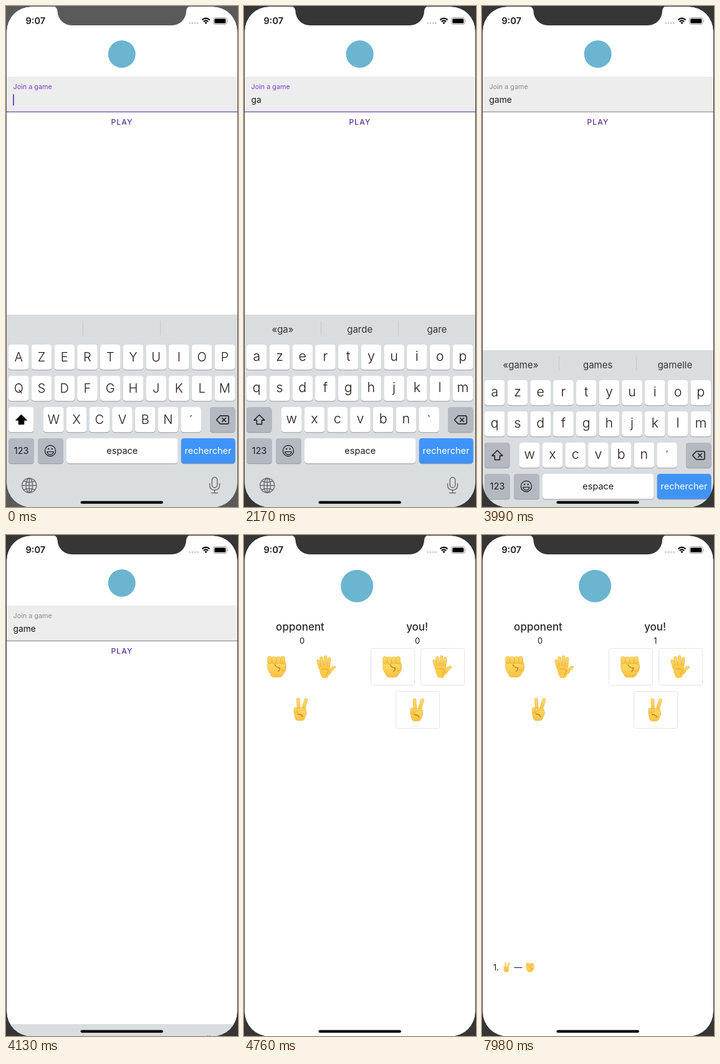
These frames come from a looping animation (372x802 px, 8000 ms). An HTML page:

```html
<!DOCTYPE html>
<html lang="fr">
<head>
<meta charset="utf-8">
<title>Hand game</title>
<style>
  html, body { margin: 0; width: 100%; height: 100%; overflow: hidden; background: #363636; }
  svg.stage { display: block; width: 100vw; height: 100vh; }
  text { font-family: Inter, Roboto, sans-serif; fill: #1c1c1e; }
  .mid { text-anchor: middle; }
  .timed { animation: 8s linear infinite; }
  .bezel { fill: #363636; animation-name: bezel; }
  .caret { fill: #7b4cc0; animation-name: blink; }
  .label { font-size: 10.8px; animation-name: label; }
  .line { animation-name: line; }
  .play { font-size: 12px; font-weight: 500; letter-spacing: 1.2px; fill: #5b2f9e; }
  .typed { font-size: 13.8px; }
  .keyboard { animation-name: hide; }
  .join { animation-name: parallax; }
  .game { animation-name: push; }
  .words { animation-name: words; }
  .hint { font-size: 15px; fill: #333; }
  .upper { font-size: 20px; font-weight: 350; }
  .lower { font-size: 21.5px; font-weight: 350; }
  .small { font-size: 14.5px; }
  .icon { fill: none; stroke: #111; stroke-width: 1.4; stroke-linejoin: round; stroke-linecap: round; }
  .gray { stroke: #6a6c70; }
  .title { font-size: 17px; font-weight: 500; fill: #2b2b2b; }
  .score { font-size: 13px; }
  .skin { fill: url(#skin); stroke: #e5a435; stroke-width: .6; }
  .crease { fill: none; stroke: #bd751b; stroke-width: 1.1; stroke-linecap: round; }
  .button { fill: #fff; stroke: #e4e4e6; }
  .press { animation-name: press; }
</style>
</head>
<body>
<script>
const LOOP = 8000;
const css = [];

// Turns {ms: declarations} into a named keyframe rule.
function frames(name, stops) {
  const body = Object.entries(stops).map(([ms, rule]) => `${ms / LOOP * 100}% {${rule}}`).join(' ');
  css.push(`@keyframes ${name} {${body}}`);
}

// Shows the content only between two times, with hard cuts.
function during(from, to, content) {
  const name = `show-${from}-${to}`;
  const stops = { 0: 'opacity:0' };
  stops[from] = 'opacity:1';
  stops[to] = to < LOOP ? 'opacity:0' : 'opacity:1';
  frames(name, stops);
  return `<g class="timed" style="animation-name:${name};animation-timing-function:step-end">${content}</g>`;
}

const ease = 'animation-timing-function:cubic-bezier(.283,.99,.318,.99);';
frames('bezel', { 0: 'fill:#5a5a5a', 70: 'fill:#5a5a5a', 910: 'fill:#363636', 8000: 'fill:#363636' });
frames('blink', {
  0: 'opacity:1', 70: 'opacity:1', 280: 'opacity:0', 420: 'opacity:0', 630: 'opacity:1',
  1890: 'opacity:1', 2100: 'opacity:0', 2200: 'opacity:0', 2380: 'opacity:1',
  3640: 'opacity:1', 3850: 'opacity:0', 8000: 'opacity:0'
});
frames('label', { 0: 'fill:#7b3fc4', 3700: 'fill:#7b3fc4', 3850: 'fill:#8a8a8a', 8000: 'fill:#8a8a8a' });
frames('line', { 0: 'fill:#7d4fb5', 3700: 'fill:#7d4fb5', 3850: 'fill:#999', 8000: 'fill:#999' });
frames('hide', {
  0: 'transform:translateY(0)', 3972: 'transform:translateY(0);' + ease,
  4330: 'transform:translateY(310px)', 8000: 'transform:translateY(310px)'
});
frames('push', {
  0: 'transform:translateX(390px)', 4139: 'transform:translateX(390px)', 4143: 'transform:translateX(372px);' + ease,
  4743: 'transform:translateX(0)', 8000: 'transform:translateX(0)'
});
frames('parallax', {
  0: 'transform:translateX(0)', 4143: 'transform:translateX(0);' + ease,
  4743: 'transform:translateX(-111px)', 8000: 'transform:translateX(-111px)'
});
frames('words', { 0: 'opacity:0', 3429: 'opacity:0', 3430: 'opacity:.6', 3499: 'opacity:.6', 3500: 'opacity:1', 8000: 'opacity:1' });
frames('press', { 0: 'opacity:0', 7200: 'opacity:0', 7280: 'opacity:.12', 7420: 'opacity:.12', 7600: 'opacity:0', 8000: 'opacity:0' });

const text = (x, y, cls, value) => `<text x="${x}" y="${y}" class="${cls}">${value}</text>`;
const rect = (x, y, w, h, r, attrs) => `<rect x="${x}" y="${y}" width="${w}" height="${h}" rx="${r}" ${attrs}/>`;
const path = (d, cls, attrs = '') => `<path d="${d}" class="${cls}" ${attrs}/>`;
const use = (id, x, y, scale = 1) => `<use href="#${id}" transform="translate(${x} ${y}) scale(${scale})"/>`;
const finger = (x, y, w, h, turn = 0) =>
  rect(x - w / 2, y - h, w, h, w / 2, `class="skin" transform="rotate(${turn} ${x} ${y})"`);

const defs = `<defs>
  <linearGradient id="skin" x1="0" y1="0" x2="0" y2="1">
    <stop offset="0" stop-color="#ffdf68"/><stop offset="1" stop-color="#f8c040"/>
  </linearGradient>
  <linearGradient id="edge"><stop offset="0" stop-opacity="0"/><stop offset="1" stop-opacity=".2"/></linearGradient>
  <g id="fist">
    ${path('M-14 -7H14C16 1 15 7 11 11Q9 17 3 17H-4Q-9 17 -10 12Q-17 4 -14 -7Z', 'skin')}
    ${[-11.3, -4.3, 2.7, 9.6].map((x, i) => finger(x, [-4, -3.5, -3.5, -4][i], 6.8, 12.4)).join('')}
    ${path('M14 -3.5Q3 -6 -3 -3.5Q-3 1.500 4 2Q6 7 11 7.500Q16 3 14 -3.500Z', 'skin')}
    ${path('M-3 -2.5Q0 2.5 5 2Q5 6 2 8', 'crease')}
  </g>
  <g id="hand">
    ${path('M2 14Q8 12 10 6Q14 3 15.300 1.500Q15.500 -1.500 12.500 -1Q8 0 5.500 5Z', 'skin')}
    ${finger(-8.8, 4, 4.2, 16, -16)}${finger(-5.3, 2, 4.6, 18.5, -8)}${finger(-.8, 2, 4.7, 20, 0)}${finger(3.7, 3, 4.4, 18.5, 6)}
    ${path('M-11 0Q-2 -4 6 0L7 6Q8 11 4 14Q3 18 0 18H-4Q-7 18 -8 14Q-11 8 -11 0Z', '', 'fill="#fbca4b"')}
    ${path('M-7 4Q0 2 3 5M5 6Q1 9 1 14', 'crease', 'stroke-opacity=".4"')}
  </g>
  <g id="victory">
    ${finger(-2.8, 4, 4.8, 22, -4)}${finger(2.6, 4, 4.8, 22.5, 17)}
    ${path('M-9 -1Q0 -4 8 0Q11 7 7 12Q6 18 1 18H-4Q-8 18 -9 13Q-12 6 -9 -1Z', 'skin')}
    ${finger(-8.2, 6, 4.8, 9)}${finger(-3.6, 7, 4.8, 9)}
    ${path('M8 1Q2 0 -4 4Q-6 7 -2 8Q2 8 4 12', 'skin')}
    ${path('M-5 8Q0 7 3 12', 'crease')}
  </g>
  <clipPath id="screen">${rect(1, 1, 370, 801.5, 39.5, '')}</clipPath>
</defs>`;

// Join screen: what is typed, when, and where the caret stands.
const typing = [['', 0, 12], ['g', 1050, 20.3], ['ga', 1540, 28.5], ['gam', 2380, 40.3], ['game', 2940, 47.6]];
const typed = typing.map(([value, from, x], i) => {
  const to = typing[i + 1]?.[1] ?? LOOP;
  return during(from, to, text(11.5, 155, 'typed', value) + rect(x - 1, 141, 2, 18.5, 1, 'class="caret timed"'));
}).join('');

const join = `<g class="join timed">
  ${rect(1, 1, 370, 802, 0, 'fill="#fff"')}
  <circle cx="185.7" cy="77" r="22" fill="#6bb5d0"/>
  ${path('M1 170V117Q1 113 5 113H367Q371 113 371 117V170Z', '', 'fill="#ededed"')}
  ${rect(1, 168.8, 370, 1.4, 0, 'class="line timed"')}
  ${text(11.5, 133, 'label timed', 'Join a game')}
  ${typed}
  ${text(186, 190.3, 'play mid', 'PLAY')}
</g>`;

// Keyboard
function key(x, y, w, fill = '#fff') {
  return rect(x, y + 1, w, 40.3, 4.6, 'fill="#96999e"') + rect(x, y, w, 40.3, 4.6, `fill="${fill}"`);
}
const DARK = '#b4b9c1', STEP = 36.72, KEY = 32.6;
const rows = [['azertyuiop', 4, 542], ['qsdfghjklm', 4, 592], ['wxcvbn', 60, 642]];
const letters = (cls, dy, convert) => rows.map(([row, x, y]) =>
  [...row].map((c, i) => text(x + i * STEP + KEY / 2, y + dy, cls + ' mid', convert(c))).join('')).join('');
const blanks = rows.map(([row, x, y]) => [...row].map((c, i) => key(x + i * STEP, y, KEY)).join('')).join('');
const hints = (...words) => words.map((word, i) => text(62 + i * 123.7, 522.5, 'hint mid', word)).join('');
const arrow = 'M24.5 654.5L33 663H28.6V669.5H20.4V663H16Z';
const accent = c => text(296.6, 670, 'upper mid', c);

const keyboard = `<g class="keyboard timed">
  ${rect(1, 494, 370, 310, 0, 'fill="#dadde0"')}
  ${path('M123.5 504V527M247.5 504V527', '', 'stroke="#c3c6ca"')}
  ${during(1190, 1680, hints('«g»', 'grand', 'gros'))}
  ${during(1680, 2520, hints('«ga»', 'garde', 'gare'))}
  ${during(2520, 3080, hints('«gam»', 'gamme', 'gamin'))}
  ${during(3080, 3430, hints('«game»', 'gamme', 'gamin'))}
  ${during(3430, LOOP, hints('«game»'))}
  <g class="words timed">${hints('', 'games', 'gamelle')}</g>
  ${blanks}${key(280.3, 642, KEY)}
  ${during(0, 1050, letters('upper', 27.2, c => c.toUpperCase()) + key(4, 642, 40.5) + path(arrow, 'icon', 'style="fill:#000"'))}
  ${during(1050, LOOP, letters('lower', 26.3, c => c) + key(4, 642, 40.5, DARK) + path(arrow, 'icon'))}
  ${during(0, 1890, accent('´'))}${during(1890, 3220, accent('`'))}${during(3220, LOOP, accent('´'))}
  ${key(327, 642, 40.5, DARK)}
  ${path('M337.5 662.5L343.5 656H355Q357 656 357 658V667Q357 669 355 669H343.5ZM346.5 659.5L352.5 665.5M352.5 659.5L346.5 665.5', 'icon')}
  ${key(4, 692, 41, DARK)}${key(51, 692, 41, DARK)}${key(97, 692, 178.5)}${key(280.8, 692, 86.7, '#3f94fb')}
  ${text(24.7, 717.3, 'small mid', '123')}
  ${text(186.3, 717, 'small mid', 'espace')}
  <text x="324" y="717" class="small mid" style="fill:#fff">rechercher</text>
  <g class="icon" style="stroke-width:1.1">
    <circle cx="71" cy="712" r="8.6"/>
    ${path('M65.8 713.5H76.2Q75.500 718 71 718T65.800 713.500Z', '')}
  </g>
  <circle cx="68.2" cy="709" r="1.1"/><circle cx="73.8" cy="709" r="1.1"/>
  <g class="icon gray">
    <circle cx="37.3" cy="767.5" r="11.5"/><ellipse cx="37.3" cy="767.5" rx="5.3" ry="11.5"/>
    ${path('M25.8 767.5H48.8M37.3 756V779M28.5 760.5Q37.3 764.5 46 760.5M28.5 774.5Q37.3 770.5 46 774.5', '')}
    ${rect(330.3, 754.5, 8.4, 16.5, 4.2, '')}
    ${path('M326.5 764.5V767Q326.5 774.8 334.5 774.8T342.5 767V764.5M334.5 775V779.5M329.5 779.5H339.5', '')}
  </g>
</g>`;

// Game screen
const button = (x, y, id) => rect(x, y, 70, 59, 3.5, 'class="button"') + use(id, x + 34, y + 29.3);
const opponent = text(90, 152.7, 'title mid', 'opponent');
const game = `<g class="game timed">
  ${rect(-8, 0, 8, 803, 0, 'fill="url(#edge)"')}
  ${rect(0, 0, 372, 803, 0, 'fill="#fff"')}
  <circle cx="181.2" cy="81.7" r="26" fill="#6bb5d0"/>
  ${during(0, 6230, opponent)}
  ${during(6230, 7420, text(92, 152.7, 'title mid', 'opponent played!'))}
  ${during(7420, LOOP, opponent)}
  ${text(277.7, 152.7, 'title mid', 'you!')}
  ${text(93, 173.7, 'score mid', '0')}
  ${during(0, 7420, text(278, 173.7, 'score mid', '0'))}
  ${use('fist', 52.5, 210.5)}${use('hand', 131.5, 211)}${use('victory', 91, 279)}
  ${button(203.5, 181.5, 'fist')}${button(283.5, 181.5, 'hand')}${button(243.5, 250.5, 'victory')}
  ${rect(203.5, 181.5, 70, 59, 3.5, 'class="press timed"')}
  ${during(7420, LOOP, text(278, 173.7, 'score mid', '1') + text(18, 696.5, 'score', '1.') +
    use('victory', 39.5, 692, .43) + text(58, 696.5, 'score mid', '—') + use('fist', 77, 692, .43))}
</g>`;

// Device frame and status bar
const frame = `
  ${path('M0 0H372V803H0ZM40.5 1A39.5 39.5 0 0 0 1 40.5V763A39.5 39.5 0 0 0 40.5 802.5H331.5A39.5 39.5 0 0 0 371 763V40.5A39.5 39.5 0 0 0 331.5 1Z', 'bezel timed', 'fill-rule="evenodd"')}
  ${path('M76 0Q82 2 82.5 8A23 23 0 0 0 105.5 31H266A23 23 0 0 0 289 8Q289.5 2 295 0Z', 'bezel timed')}
  <text x="31.5" y="29.3" style="font-size:14.5px;font-weight:600">9:07</text>
  ${[0, 1, 2, 3].map(i => `<circle cx="${294.7 + i * 4.2}" cy="27.5" r="1.4" fill="#c9c9cb"/>`).join('')}
  ${path('M314.5 22.3Q320.5 16.8 326.5 22.3M316.8 25Q320.5 21.6 324.2 25', 'icon', 'style="stroke-width:2.2;stroke:#000;stroke-linecap:butt"')}
  ${path('M318.3 26.6Q320.5 24.8 322.7 26.6L320.5 29Z', '')}
  ${rect(332.5, 18.5, 21.5, 11, 3, 'fill="none" stroke="#999"')}
  ${rect(334.2, 20.2, 18.1, 7.6, 1.6, '')}
  ${path('M355.3 22Q357 24 355.3 26Z', '', 'fill="#999"')}
  ${rect(119.5, 792.4, 132.5, 4.4, 2.2, '')}`;

document.body.innerHTML = `<svg class="stage" viewBox="0 0 372 802" preserveAspectRatio="none">${defs}
  <g clip-path="url(#screen)">${join}${keyboard}${game}</g>
  ${frame}</svg>`;
document.head.append(Object.assign(document.createElement('style'), { textContent: css.join('\n') }));
</script>
</body>
</html>
```
